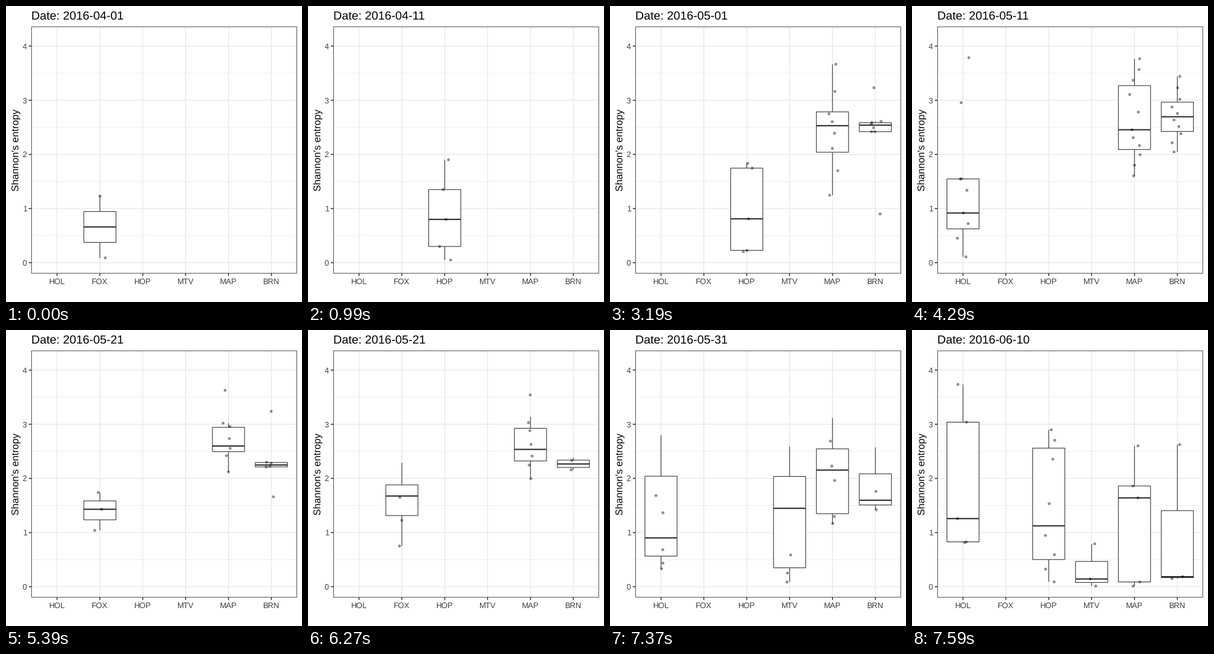
Write a matplotlib script that moves like this. It is 480 by 480 pixels and loops after 8000 ms.

```python
import matplotlib.pyplot as plt
import numpy as np
from matplotlib.animation import FuncAnimation
from matplotlib.collections import LineCollection, PolyCollection
from matplotlib.patches import Rectangle

SIZE = 480
LEFT, RIGHT, TOP, BOTTOM = 41, 472, 33.4, 433.7
ZERO, UNIT = 416.3, 87.83          # pixel row of 0, pixels per entropy unit
STEP = (RIGHT - LEFT) / 6.2        # distance between sites
HALF = 0.375 * STEP                # half a box width
JITTER = 10
SITES = ["HOL", "FOX", "HOP", "MTV", "MAP", "BRN"]
X = {site: LEFT + STEP * (i + 0.6) for i, site in enumerate(SITES)}
START = np.datetime64("2016-04-01")
DAYS = 10

INTERVAL, LOOP = 20, 8000
CYCLE, HOLD, TWEEN = 1100, 880, 110
INK, GRID, LABEL = "#333333", "#ebebeb", "#404040"

plt.rcParams["font.family"] = "Liberation Sans"
plt.rcParams["text.hinting"] = "none"
rng = np.random.default_rng(4)


def row(value):
    return ZERO - UNIT * value


def sample(n, low, q1, mid, q3, high, *outliers):
    """A box and n dots spread evenly over its quantiles, plus outliers."""
    box = np.array([low, q1, mid, q3, high])
    spread = np.interp(np.linspace(0, 1, n), np.linspace(0, 1, 5), box)
    values = np.append(spread, outliers)
    return box, np.column_stack([rng.uniform(-JITTER, JITTER, len(values)),
                                 values])


# One entry per date, ten days apart
states = [
    dict(FOX=sample(2, 0.09, 0.375, 0.66, 0.945, 1.23)),
    dict(HOP=sample(5, 0.05, 0.3, 0.8, 1.35, 1.9)),
    dict(FOX=sample(4, 0.87, 1.63, 2.365, 2.92, 3.14),
         MAP=sample(12, 0.05, 0.885, 1.39, 2.045, 2.78),
         BRN=sample(5, 0.81, 0.875, 1.185, 1.35, 1.69, 0.16)),
]
states += [
    dict(HOP=sample(5, 0.205, 0.228, 0.81, 1.746, 1.835),
         MAP=sample(8, 1.245, 2.04, 2.53, 2.785, 3.665),
         BRN=sample(6, 2.42, 2.42, 2.54, 2.585, 2.61, 0.9, 3.23)),
    dict(HOL=sample(7, 0.108, 0.625, 0.918, 1.547, 1.547, 2.955, 3.785),
         MAP=sample(11, 1.605, 2.09, 2.455, 3.27, 3.765),
         BRN=sample(10, 2.045, 2.424, 2.695, 2.965, 3.44)),
    dict(FOX=sample(3, 1.04, 1.235, 1.43, 1.585, 1.74),
         MAP=sample(6, 2.12, 2.494, 2.598, 2.943, 3.02, 3.627),
         BRN=sample(4, 2.21, 2.213, 2.248, 2.294, 2.3, 1.66, 3.238)),
]
states += [
    dict(HOL=sample(10, 0.09, 0.434, 0.723, 1.542, 2.33, 3.222),
         FOX=sample(9, 0.173, 1.472, 2.163, 2.472, 3.377),
         MTV=sample(9, 0.125, 0.485, 2.1, 2.82, 3.485),
         MAP=sample(7, 1.743, 1.978, 2.41, 2.888, 3.37),
         BRN=sample(2, 2.057, 2.18, 2.302, 2.424, 2.547)),
    dict(HOL=sample(5, 0.815, 0.828, 1.258, 3.038, 3.735),
         HOP=sample(8, 0.09, 0.502, 1.124, 2.559, 2.897),
         MTV=sample(3, 0.013, 0.078, 0.143, 0.467, 0.792),
         MAP=sample(5, 0.012, 0.088, 1.64, 1.86, 2.602),
         BRN=sample(3, 0.15, 0.168, 0.185, 1.405, 2.624)),
]

fig = plt.figure(figsize=(SIZE / 72, SIZE / 72), dpi=72, facecolor="white")
ax = fig.add_axes([0, 0, 1, 1])
ax.set(xlim=(0, SIZE), ylim=(SIZE, 0))
ax.axis("off")


def add(art):
    art.set_snap(False)
    return ax.add_collection(art, autolim=False)


def lines(segments, color, width, z):
    return add(LineCollection(segments, colors=color, linewidths=width,
                              zorder=z, capstyle="butt"))


def hline(y, x0=LEFT, x1=RIGHT):
    return [(x0, y), (x1, y)]


def vline(x, y0=TOP, y1=BOTTOM):
    return [(x, y0), (x, y1)]


def label(x, y, text, size=12.8, color=LABEL, ha="center", **kw):
    return ax.text(x, y, text, size=size, color=color, ha=ha, va="baseline",
                   **kw)


# Panel, grid and axes
ticks = range(5)
lines([hline(row(v + 0.5)) for v in range(4)], GRID, 0.78, 1)
lines([hline(row(v)) for v in ticks] + [vline(x) for x in X.values()],
      GRID, 1.55, 1)
lines([hline(row(v), LEFT - 4, LEFT) for v in ticks]
      + [vline(x, BOTTOM, BOTTOM + 4) for x in X.values()], INK, 1.55, 1)
ax.add_patch(Rectangle((LEFT + 0.4, TOP + 0.4), RIGHT - LEFT - 0.8,
                       BOTTOM - TOP - 0.8, fill=False, ec=INK, lw=0.85,
                       zorder=6, snap=False))
for v in ticks:
    label(LEFT - 7.2, row(v) + 4.6, str(v), ha="right")
for site, x in X.items():
    label(x, 451.2, site)
label(21, (TOP + BOTTOM) / 2, "Shannon's entropy", 16, "black",
      rotation=90, rotation_mode="anchor")
title = label(LEFT, 22, "", 19.2, "black", "left")

# Moving parts; paired line widths keep single shapes off the pixel grid
whiskers = lines([], INK, 1.07, 3)
boxes = add(PolyCollection([], facecolors="white", edgecolors=INK,
                           linewidths=[1.07] * 2, zorder=3.1))
medians = lines([], INK, 2.13, 3.2)
dots = ax.scatter([], [], s=3.9 ** 2, facecolors=(0, 0, 0, 0.4),
                  edgecolors=(0, 0, 0, 0.4), zorder=4)
dots.set_linewidths([0.7] * 2)


def tween(a, b, f):
    """Blend what both states share; the rest leaves at once, enters last."""
    mixed = {}
    for site in a.keys() & b.keys():
        (box_a, pts_a), (box_b, pts_b) = a[site], b[site]
        n = min(len(pts_a), len(pts_b))
        mixed[site] = (box_a + (box_b - box_a) * f,
                       pts_a[:n] + (pts_b[:n] - pts_a[:n]) * f)
    return mixed


def scene(t):
    k, phase = divmod(t + TWEEN, CYCLE)
    if phase < HOLD:
        return k, states[k]
    f = (1 + (phase - HOLD) // TWEEN) / 3
    return k + round(f), tween(states[k], states[k + 1], f)


def draw(n):
    k, groups = scene(n * INTERVAL + INTERVAL // 2)
    title.set_text(f"Date: {START + DAYS * k}")
    stems, rects, mids, pts = [], [], [], []
    for site in SITES:
        if site not in groups:
            continue
        box, points = groups[site]
        x = X[site]
        x0, x1 = x - HALF, x + HALF
        low, q1, mid, q3, high = row(box)
        stems += [vline(x, q3, high), vline(x, q1, low)]
        rects.append([(x0, q1), (x0, q3), (x1, q3), (x1, q1)])
        mids.append(hline(mid, x0, x1))
        pts += [(x + dx, row(v)) for dx, v in points]
    whiskers.set_segments(stems)
    boxes.set_verts(rects)
    medians.set_segments(mids)
    dots.set_offsets(np.array(pts).reshape(-1, 2))
    return title, whiskers, boxes, medians, dots


anim = FuncAnimation(fig, draw, frames=LOOP // INTERVAL, interval=INTERVAL,
                     repeat=True, repeat_delay=0, blit=False)
plt.show()
```
